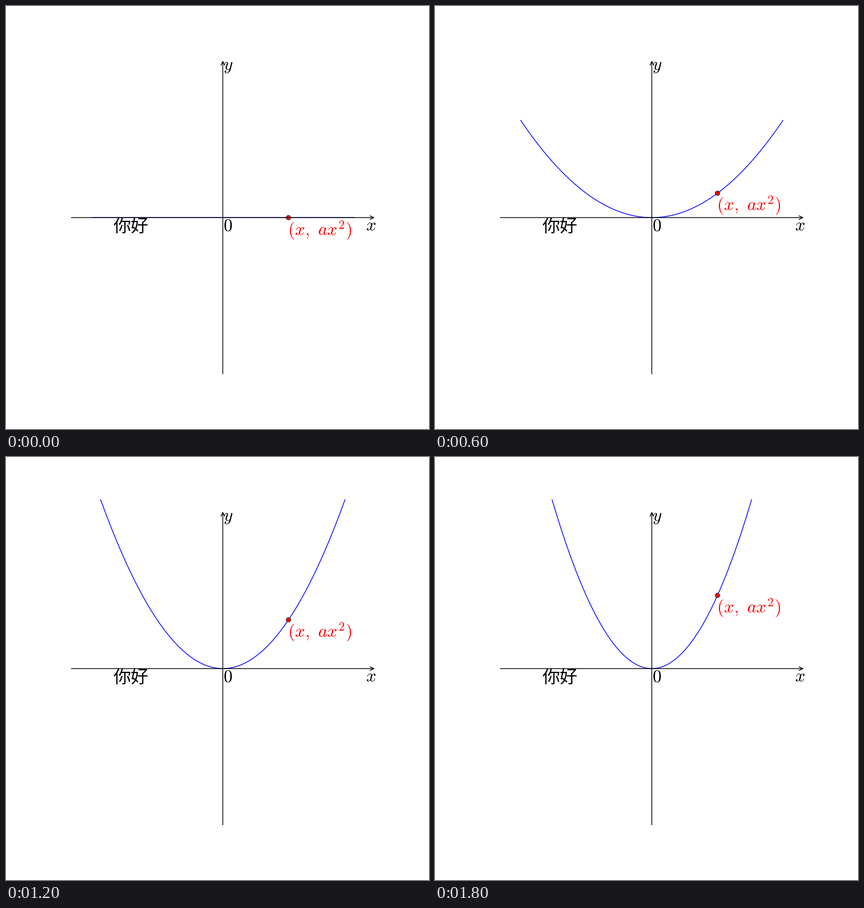
These frames come from a looping animation (748 by 748 pixels, 2000 ms). A matplotlib script:

```python
import numpy as np
import matplotlib.pyplot as plt
from matplotlib.animation import FuncAnimation
from matplotlib.patches import Circle, Rectangle

SIZE, DPI = 748, 64
FRAMES, INTERVAL = 10, 200
PT = 72 / DPI            # points per pixel
OX, OY = 383.4, 374.2    # origin of the plot
UNIT = 116.1             # pixels per x unit
RISE = 14.38             # pixels per frame at x = 1
EM = 31.3
LINE = 1.35

plt.rcParams["mathtext.fontset"] = "cm"

fig = plt.figure(figsize=(SIZE / DPI, SIZE / DPI), dpi=DPI, facecolor="white")
ax = fig.add_axes([0, 0, 1, 1])
ax.set(xlim=(0, SIZE), ylim=(SIZE, 0))
ax.axis("off")


def stroke(xs, ys, color, z):
    line, = ax.plot(xs, ys, color=color, lw=LINE * PT, zorder=z, snap=False,
                    solid_capstyle="butt", solid_joinstyle="round")
    return line


def label(x, base, text, color="black", **kw):
    return ax.text(x, base, text, color=color, fontsize=EM * PT,
                   ha="left", va="baseline", zorder=5, **kw)


# Axes with open arrow heads
stroke([115, 650.5], [OY, OY], "black", 4)
stroke([OX, OX], [651, 98], "black", 4)
stroke([643.3, 650.5, 643.3], [OY - 3.4, OY, OY + 3.4], "black", 4)
stroke([OX - 3.4, OX, OX + 3.4], [105.2, 98, 105.2], "black", 4)

label(384, 397.5, "$0$")
label(635.7, 397, "$x$")
label(384.5, 112.5, "$y$")
label(189.5, 400, "你好", family="Noto Sans CJK JP")

ts = np.linspace(-2, 2, 81)
curve = stroke([], [], "blue", 2)
curve.set_clip_path(Rectangle((0, 74.8), SIZE, SIZE, transform=ax.transData))

dot = Circle((OX + UNIT, OY), 4, fc="red", ec="black", lw=0.7 * PT, zorder=3)
ax.add_patch(dot)
tag = label(498.5, 405, r"$(x,\ ax^2)$", "red")


def draw(i):
    rise = RISE * i
    curve.set_data(OX + UNIT * ts, OY - rise * ts**2)
    dot.center = OX + UNIT, OY - rise
    tag.set_y(405 - rise)
    return curve, dot, tag


anim = FuncAnimation(fig, draw, frames=FRAMES, interval=INTERVAL, repeat=True)
plt.show()
```
